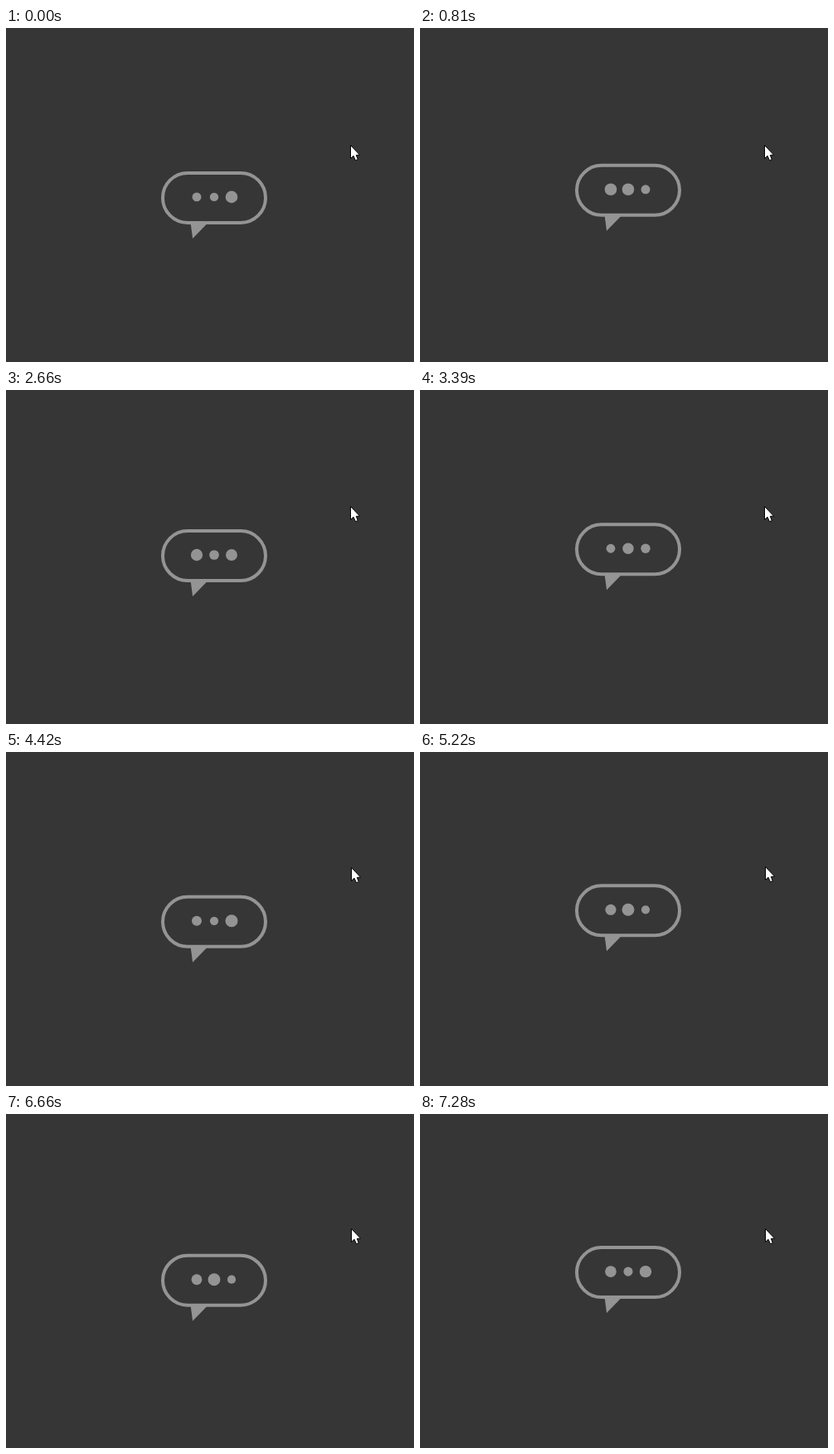
Animation of 492x403 px, one loop 7340 ms. Source, as an HTML page with a canvas:

```html
<!DOCTYPE html>
<html lang="en">
<head>
<meta charset="utf-8">
<title>Typing bubble</title>
<style>
  html, body { margin: 0; width: 100%; height: 100%; overflow: hidden; background: #363636; }
  canvas { display: block; width: 492px; height: 403px; }
</style>
</head>
<body>
<canvas id="stage" width="492" height="403"></canvas>
<script>
const ctx = document.getElementById('stage').getContext('2d');
const LOOP = 7340, STEP = 67.95, LAST_STEP = 107;
const FLOAT = 2020, PULSE = 1515;
const GREY = '#949494';

const pulsePeaks = [0.625, 0.44, 0.91];
const nudgeTimes = [1700, 4080, 4890];

const wave = cycles => Math.cos(2 * Math.PI * cycles);

function drawBubble(top, time) {
  ctx.strokeStyle = ctx.fillStyle = GREY;
  ctx.lineWidth = 4;
  ctx.beginPath();
  ctx.roundRect(189, top + 2, 124, 60, 30);
  ctx.stroke();

  ctx.beginPath();
  ctx.moveTo(222.7, top + 63);
  ctx.lineTo(242.6, top + 63);
  ctx.lineTo(225.1, top + 81);
  ctx.fill();

  pulsePeaks.forEach((peak, i) => {
    const radius = 6.3 + 1.2 * wave(time / PULSE - peak);
    ctx.beginPath();
    ctx.arc(230 + 21 * i, top + 31, radius, 0, 2 * Math.PI);
    ctx.fill();
  });
}

// Each nudge lifts the pointer a pixel; from the second on it also sits a pixel right.
function drawPointer(time) {
  const nudges = nudgeTimes.filter(t => t <= time).length;
  ctx.save();
  ctx.translate(nudges > 1 ? 416 : 415, 141 - nudges);
  ctx.fillStyle = '#fff';
  ctx.strokeStyle = '#000';
  ctx.lineWidth = 1;
  const arrow = new Path2D('M.5 .5V16.5L4 13.2L6.3 18.5L9.4 17.8L7.3 12.4L11.5 12.1Z');
  ctx.fill(arrow);
  ctx.stroke(arrow);
  ctx.restore();
}

function draw(time) {
  ctx.fillStyle = '#363636';
  ctx.fillRect(0, 0, 492, 403);
  ctx.fillStyle = '#383536';
  ctx.fillRect(0, 399, 492, 4);
  drawBubble(166.6 + 7.5 * wave(time / FLOAT - 0.092), time);
  drawPointer(time);
}

const start = performance.now();

function tick() {
  const now = (performance.now() - start) % LOOP;
  const step = Math.min(LAST_STEP, Math.floor((now + 10) / STEP));
  draw(step * STEP);
  requestAnimationFrame(tick);
}

tick();
</script>
</body>
</html>
```
